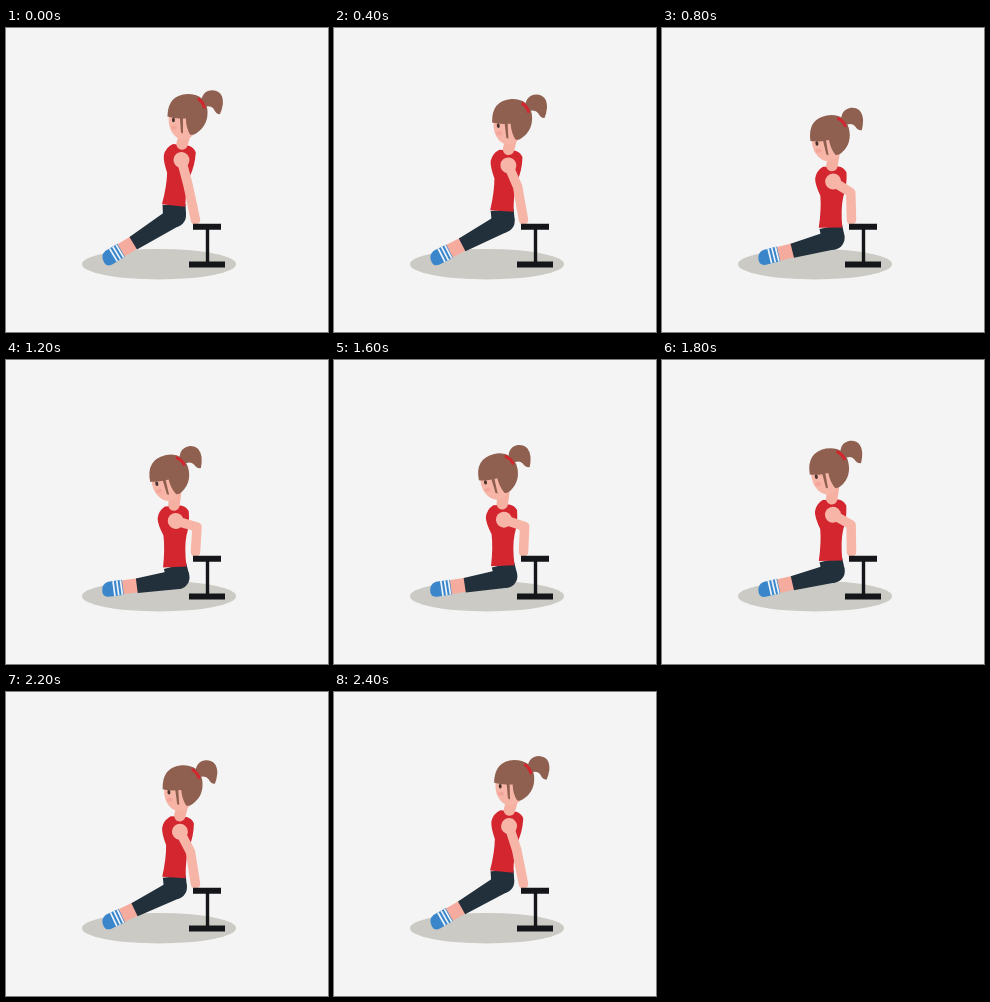
Animation, 322 px wide and 304 px high, one loop 2500 ms. Source, as an HTML page:

```html
<!DOCTYPE html>
<html lang="en">
<head>
<meta charset="utf-8">
<title>Bench dip</title>
<style>
  html, body { margin: 0; width: 100%; height: 100%; overflow: hidden; background: #f4f4f4; }
  svg { display: block; width: 100vw; height: 100vh; }
</style>
</head>
<body>
<svg viewBox="0 0 322 304">
  <ellipse cx="153" cy="236.2" rx="77" ry="15.3" fill="#cbcac4"/>

  <!-- origin at the sole, x axis along the leg -->
  <g id="leg">
    <path d="M12 -7H29V7H12Z" fill="#f5ac9e"/>
    <path d="M-1 -7.5H13V7.5H-2Q-8 7 -8 2Q-8 -6 -1 -7.5Z" fill="#3b86cb"/>
    <path d="M4 -7.5V7.5M7.8 -7.5V7.5M11.5 -7.5V7.5" stroke="#eef4fa" stroke-width="1.7"/>
    <path id="thigh" fill="#22303b"/>
  </g>
  <path id="seat" fill="none" stroke="#22303b" stroke-width="23"/>
  <circle id="hip" r="11.5" fill="#22303b"/>

  <!-- origin at the middle of the waist -->
  <g id="torso">
    <path d="M-7 -60Q-14 -56 -15 -48Q-15 -42 -10 -31Q-9 -18 -12 1H11.5Q10 -18 13 -30Q17 -41 16.5 -54Q14 -59 9 -60Z" fill="#d3262f"/>
    <path d="M4 -72L2 -61" stroke="#f5b0a2" stroke-width="11.5" stroke-linecap="round"/>
    <g id="head">
      <path d="M13 -12Q14 -25 25 -25Q36 -24 35 -11Q34 -5 32 -1Q28 -1 26 -6Q23 -11 15 -8Z" fill="#8f5f4f"/>
      <path d="M-18 -8Q-21 8 -17 15Q-13 23 -6 24Q5 24 10 12L4 -10Z" fill="#f6b5a7"/>
      <path d="M-20.5 1Q-20 -21 0 -21.5Q17 -21 19.5 -6Q21 10 8 18Q5 20 2 19Q-2 12 -2 3H-5V18L-7 17L-8 3Q-14 3 -20.5 1Z" fill="#8f5f4f"/>
      <path d="M10 -17Q16 -13 16.5 -7" fill="none" stroke="#d3262f" stroke-width="3"/>
      <ellipse cx="-14.5" cy="4.5" rx="1.5" ry="2.2" fill="#49332f"/>
      <ellipse cx="-14" cy="12" rx="3" ry="2" fill="#f4a59a"/>
    </g>
    <circle cx="3" cy="-45" r="8" fill="#f6b5a7"/>
  </g>
  <path id="arm" fill="none" stroke="#f6b5a7" stroke-width="9.5" stroke-linejoin="round" stroke-linecap="round"/>

  <path d="M187 198.7H215M183 236.5H219" stroke="#14161a" stroke-width="6"/>
  <path d="M201.5 200V235" stroke="#14161a" stroke-width="3.4"/>
</svg>
<script>
const LOOP = 2500, STEP = 100;
const SOLE = [104, 229], HAND = [189.5, 192], SHOULDER = [3, -45];

const mix = (a, b, d) => a + (b - a) * d;
const mixPoint = (a, b, d) => a.map((v, i) => mix(v, b[i], d));
const ease = p => (1 - Math.cos(Math.PI * Math.min(1, Math.max(0, p)))) / 2;
const set = (id, key, value) => document.getElementById(id).setAttribute(key, value);
const place = (id, [x, y], angle = 0) => set(id, 'transform', `translate(${x} ${y}) rotate(${angle})`);
const line = (...points) => 'M' + points.map(p => p.join(' ')).join('L');

function turn([x, y], degrees, [ox, oy]) {
  const a = degrees * Math.PI / 180, c = Math.cos(a), s = Math.sin(a);
  return [ox + x * c - y * s, oy + x * s + y * c];
}

// 0 = arms straight, 1 = lowest point of the dip
const depth = t => t < 1300 ? ease((t - 100) / 1050) : 1 - ease((t - 1450) / 1150);

function draw(t) {
  const d = depth(t);
  const waist = mixPoint([168, 176.5], [169, 206], d);
  const hip = mixPoint([168.5, 187.5], [172, 217.5], d);
  const elbow = mixPoint([182, 157], [191, 167], d);
  const lean = mix(5.7, -2.9, d);

  // The leg points slightly below the hip joint
  const dx = hip[0] - SOLE[0], dy = hip[1] + 2.5 - SOLE[1];
  const length = Math.hypot(dx, dy);
  place('leg', SOLE, Math.atan2(dy, dx) * 180 / Math.PI);
  set('thigh', 'd', `M27 -7L${length} -10.5V9L27 7.5Z`);
  place('hip', hip);
  set('seat', 'd', line(waist, hip));

  place('torso', waist, lean);
  place('head', [mix(5, -0.5, d), -90], mix(-6, -10, d));
  set('arm', 'd', line(turn(SHOULDER, lean, waist), elbow, HAND));
}

const start = performance.now();
function tick() {
  const t = (performance.now() - start) % LOOP;
  draw(Math.floor(t / STEP) * STEP);
  requestAnimationFrame(tick);
}
tick();
</script>
</body>
</html>
```
